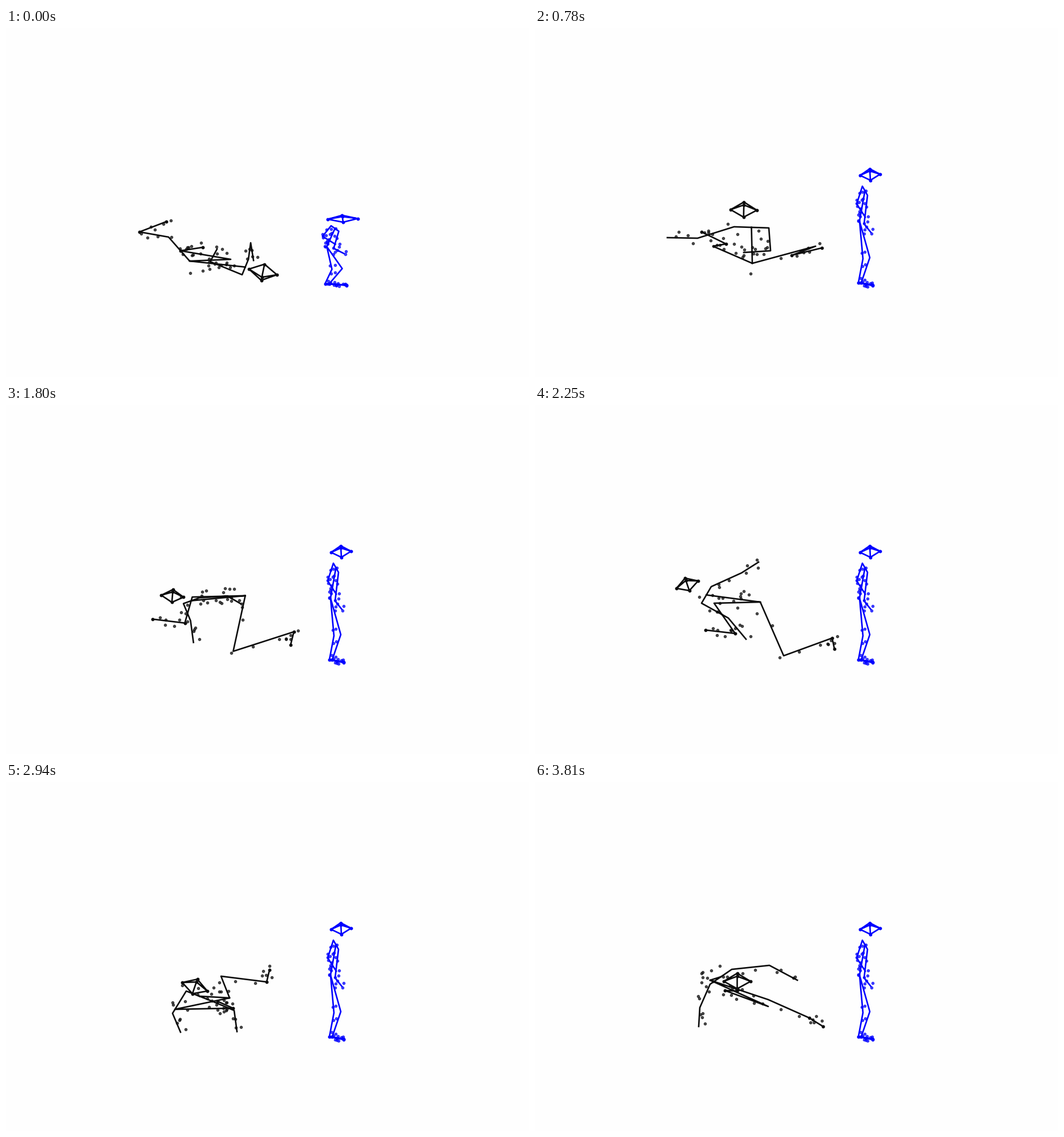
Recreate the animation shown at these times as a matplotlib script. Size 917x611 px, loop 3840 ms.

```python
import numpy as np
import matplotlib.pyplot as plt
from matplotlib.animation import FuncAnimation

W, H, DPI = 917, 611, 100
FRAMES, STEP = 128, 30
FLOOR = 450
RISE = 20  # frames until the blue figure stands

# Joints: hand, elbow, shoulder, shoulder, elbow, hand, root,
# knee, ankle, toe, knee, ankle, toe, two sides of the head.
# Derived joints: neck 15, mid back 16, head top 17, head base 18, crown 19
CHAINS = [
    [0, 1, 2, 15, 3, 4, 5],
    [15, 16, 6],
    [9, 8, 7, 6, 10, 11, 12],
    [13, 17, 14, 18, 13, 19, 14],
    [17, 19, 18],
]
PATH = [i for c in CHAINS for i in c + [20]]  # joint 20 is a gap
DOTTED = [8, 9, 11, 12, 13, 14, 17, 18, 19]


def pose(arms, legs, head):
    return np.array((arms + " " + legs + " " + head).split(),
                    float).reshape(-1, 2)


# Start frame of each key pose of the dark figure
KEYS = {
    0: pose("370 387 358 409 414 432 425 405 429 376 434 407",
            "322 408 285 366 234 357 281 339 394 405 306 390 345 384",
            "475 432 426 422"),
    26: pose("232 367 285 368 349 348 410 350 413 390 366 393",
             "381 412 312 382 335 378 292 357 492 382 450 398 503 385",
             "343 318 389 319"),
    45: pose("268 415 297 384 337 351 385 365 420 393 420 438",
             "431 345 331 344 295 366 242 355 378 401 472 380 470 393",
             "314 344 356 364"),
    75: pose("370 410 339 373 292 347 309 318 362 294 392 275",
             "395 345 314 347 351 400 299 394 436 439 521 408 525 427",
             "248 321 286 308"),
    98: pose("306 438 292 405 316 366 362 384 400 400 405 437",
             "392 378 296 398 398 396 371 384 377 340 457 350 462 329",
             "309 351 353 366"),
    115: pose("250 405 296 376 335 342 376 360 363 409 371 444",
              "342 395 409 343 413 362 446 340 467 399 399 407 430 381",
              "343 320 379 318"),
    127: pose("287 428 289 395 307 354 345 328 411 321 460 347",
              "307 347 409 393 333 365 354 366 409 381 481 413 505 428",
              "331 349 378 349"),
}
STANDING = pose("579 331 564 308 574 277 583 293 577 343 589 358",
                "569 338 575 404 567 446 592 451 587 402 572 446 592 450",
                "570 258 605 256")

TIMES = np.array(list(KEYS))
POSES = np.array(list(KEYS.values()))
SLOPES = np.gradient(POSES, TIMES, axis=0)


def add_derived(p):
    """Append neck, mid back and the rest of the head pyramid."""
    neck = (p[2] + p[3]) / 2
    centre, half = (p[13] + p[14]) / 2, (p[14] - p[13]) / 2
    up = np.array([half[1], -half[0]])
    return np.vstack([p, neck, (neck + p[6]) / 2, centre + 0.6 * up,
                      centre - 0.55 * up, centre + 0.38 * up])


def dark_joints(n):
    """Cubic Hermite motion through the key poses."""
    k = min(np.searchsorted(TIMES, n, side="right") - 1, len(TIMES) - 2)
    span = TIMES[k + 1] - TIMES[k]
    s = (n - TIMES[k]) / span
    rise = s * s * (3 - 2 * s)
    return add_derived((1 - rise) * POSES[k] + rise * POSES[k + 1]
                       + span * s * (1 - s) * ((1 - s) * SLOPES[k]
                                               - s * SLOPES[k + 1]))


def rise_up(pts, n):
    """Stretch from a flattened, widened crouch to full height."""
    s = min(n / RISE, 1)
    left = 1 - s * s * (3 - 2 * s)
    scale = np.array([1 + 0.5 * left, 1 - 0.4 * left])
    pivot = np.array([582, FLOOR])
    return pivot + (pts - pivot) * scale


def scatter_markers(seed, spread):
    """Seeded body markers: bone ends, place along the bone, offset."""
    rng = np.random.default_rng(seed)
    ends, places, offsets = [], [], []
    for shoulder, elbow, hand, knee, ankle, toe in (
            (2, 1, 0, 7, 8, 9), (3, 4, 5, 10, 11, 12)):
        for a, b, count, wide in (
                (shoulder, elbow, 2, 0.8), (elbow, hand, 4, 0.8),
                (shoulder, 6, 6, 1.5), (6, knee, 2, 0.8),
                (knee, ankle, 2, 0.6), (ankle, toe, 5, 0.8)):
            for i in range(count):
                ends.append((a, b))
                places.append((i + rng.uniform(0.4, 1.1)) / count)
                turn = rng.uniform(0, 2 * np.pi)
                reach = spread * wide * rng.uniform(0.4, 1)
                offsets.append((reach * np.cos(turn), reach * np.sin(turn)))
    return np.array(ends), np.array(places)[:, None], np.array(offsets)


def with_markers(joints, markers):
    ends, places, offsets = markers
    a, b = joints[ends[:, 0]], joints[ends[:, 1]]
    return np.vstack([joints, a + places * (b - a) + offsets])


class Figure:
    def __init__(self, color):
        self.marks = ax.scatter([], [], s=9, c=color, linewidths=1,
                                alpha=0.7, zorder=2)
        self.lines, = ax.plot([], [], color=color, lw=1.9, zorder=3)
        self.dots, = ax.plot([], [], "o", color=color, ms=3.2, zorder=4)

    def draw(self, pts):
        joints = np.vstack([pts[:20], [np.nan, np.nan]])
        self.lines.set_data(*joints[PATH].T)
        self.dots.set_data(*joints[DOTTED].T)
        self.marks.set_offsets(pts[20:])
        return [self.marks, self.lines, self.dots]


fig = plt.figure(figsize=(W / DPI, H / DPI), dpi=DPI, facecolor="#fefefe")
ax = fig.add_axes([0, 0, 1, 1])
ax.set(xlim=(0, W), ylim=(H, 0))
ax.axis("off")

dark, blue = Figure("#0c0c0c"), Figure("blue")
dark_markers = scatter_markers(4, 14)
blue_points = with_markers(add_derived(STANDING), scatter_markers(7, 8))


def update(n):
    return (dark.draw(with_markers(dark_joints(n), dark_markers))
            + blue.draw(rise_up(blue_points, n)))


anim = FuncAnimation(fig, update, frames=FRAMES, interval=STEP,
                     init_func=lambda: update(0), repeat=True,
                     repeat_delay=0, blit=False)
plt.show()
```
